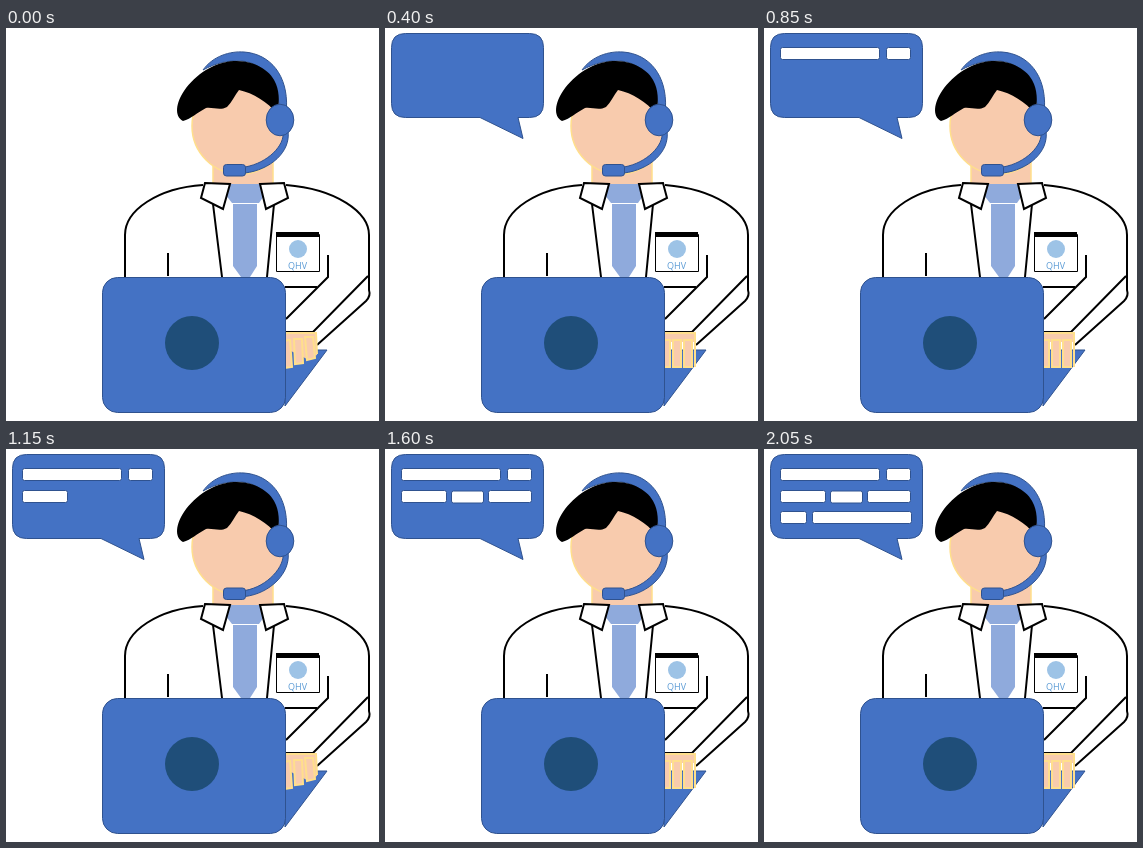
An HTML page with a canvas that plays this animation: 373 by 393 pixels, repeating every 4550 ms.

```html
<!DOCTYPE html>
<html lang="en">
<head>
<meta charset="utf-8">
<title>Help desk</title>
<style>
  html, body { margin: 0; width: 100%; height: 100%; overflow: hidden; background: #fff; }
  canvas { display: block; width: 373px; height: 393px; }
</style>
</head>
<body>
<canvas id="stage" width="373" height="393"></canvas>
<script>
const ctx = document.getElementById('stage').getContext('2d');
const LOOP = 4550;
const BLUE = '#4472c4', EDGE = '#2f528f', NAVY = '#1f4e79';
const TIE = '#8faadc', SKIN = '#f8cbad', GOLD = '#ffdf8c';

// Typed words: start time, x, y, width
const WORDS = [
  [700, 16, 19, 100], [850, 122, 19, 25],
  [1150, 16, 41, 46], [1300, 66, 41.5, 33], [1600, 103, 41, 44],
  [1750, 16, 62, 27], [2050, 48, 62, 100]
];
// The microphone flips between raised and lowered at these times
const NODS = [300, 400, 700, 850, 1150, 1300, 1600, 1750, 2050];

function paint(path, fill, stroke, width = 1) {
  if (fill) {
    ctx.fillStyle = fill;
    ctx.fill(path);
  }
  if (stroke) {
    ctx.strokeStyle = stroke;
    ctx.lineWidth = width;
    ctx.stroke(path);
  }
}

function shape(d, fill, stroke, width) {
  paint(new Path2D(d), fill, stroke, width);
}

function box(x, y, w, h, r, fill, stroke, width) {
  const p = new Path2D();
  p.roundRect(x, y, w, h, r);
  paint(p, fill, stroke, width);
}

function oval(x, y, rx, ry, fill, stroke, width) {
  const p = new Path2D();
  p.ellipse(x, y, rx, ry, 0, 0, Math.PI * 2);
  paint(p, fill, stroke, width);
}

function drawHead(low) {
  box(207, 125, 60, 33, 0, SKIN, GOLD, 1.5);
  oval(234, 98, 48, 48, SKIN, GOLD, 1.5);
  shape('M197 42C207 28 224 23 238 24C265 26 282 48 280.5 80L273 80C273 55 258 35 236 33C222 32 210 35 197 42Z', BLUE, EDGE);
  shape('M177 93C168 88 170 75 178 63C190 46 208 34 228 33C250 32 266 44 270 56C274 66 273 76 271 86C262 74 247 65 233 62C229 67 226 74 221 79C214 83 207 79 200 80C192 84 185 91 177 93Z', '#000');
  // Microphone arm
  const y = 139 + low;
  shape(`M277 104C279 117 262 ${y - 4} 239 ${y}L239 ${y + 6}C264 ${y + 3} 285 124 282 103Z`, BLUE, EDGE);
  oval(274, 92, 13.8, 15.8, BLUE, EDGE);
  box(217.5, 136.5 + low, 22, 11.5, 3, BLUE, EDGE);
}

function drawCoat() {
  shape('M119 249V207C119 182 152 160 197 157M280 157C330 161 363 184 363 207V262Q365 268 360 273L311 317', null, '#000', 2);
  shape('M162 225V248M207 176L216 249M268 176L261 249', null, '#000', 2);
  shape('M222 156H256L260 165L253 175H226L219 166Z', TIE);
  shape('M227 176H251V238L244 249H235L227 238Z', TIE);
  shape('M199 155L224 156L217 181L195 170Z', '#fff', '#000', 2);
  shape('M254 156L278 155L282 170L260 181Z', '#fff', '#000', 2);
  shape('M322 227V249L280 291M279 259H311M362 248L307 304H280', null, '#000', 2);
}

function drawBadge() {
  box(270.5, 206.5, 43, 37, 0, '#fff', '#000');
  box(270, 204, 43, 5, 0, '#000');
  oval(292, 221, 9, 9, '#9dc3e6');
  ctx.fillStyle = '#5b9bd5';
  ctx.font = '9px "Open Sans", sans-serif';
  ctx.textAlign = 'center';
  ctx.fillText('QHV', 291.5, 241);
}

function drawHand(tapping) {
  shape('M279 322H321L279 378Z', BLUE, EDGE);
  if (tapping) {
    shape('M279 305H310L311 327L301 331L279 320Z', SKIN);
    shape('M277 313L284 312L286 339L278 340Z', SKIN, GOLD, 2);
    shape('M288 311H296L297 335L289 336Z', SKIN, GOLD, 2);
    shape('M299 309H307L309 330L301 332Z', SKIN, GOLD, 2);
    shape('M279 305H310L311 326', null, GOLD, 2);
  } else {
    box(279, 305, 31, 9, 0, SKIN);
    for (const x of [277, 288, 299]) box(x, 312, 8, 27, 0, SKIN, GOLD, 2);
    shape('M279 305H310V339', null, GOLD, 2);
  }
}

function drawLaptop() {
  box(96.5, 249.5, 183, 135, 15, BLUE, EDGE);
  oval(186, 315, 27, 27, NAVY);
}

function drawBubble(t) {
  if (t < 300) return;
  ctx.save();
  if (t < 400) {
    ctx.translate(84.5, 74);
    ctx.rotate(-0.588);
    ctx.scale(0.64, 0.64);
    ctx.translate(-82.5, -47.5);
  }
  shape('M20.5 5.5H144.5Q158.5 5.5 158.5 19.5V75.5Q158.5 89 134 89.5L138 110.5L95 89.5H20.5Q6.5 89.5 6.5 75.5V19.5Q6.5 5.5 20.5 5.5Z'
    .replace('Q158.5 89 134 89.5', 'Q158.5 89.5 144.5 89.5H133'), BLUE, EDGE);
  ctx.restore();
  for (const [start, x, y, w] of WORDS) {
    if (t >= start) box(x + 0.5, y + 0.5, w - 1, 12, 2, '#fff', EDGE);
  }
}

function draw(t) {
  const nods = NODS.filter(n => t >= n).length;
  const tapping = t < 400 || (t >= 1150 && t < 1600);
  ctx.fillStyle = '#fff';
  ctx.fillRect(0, 0, 373, 393);
  drawHead(nods % 2 ? 2.5 : 0);
  drawCoat();
  drawBadge();
  drawHand(tapping);
  drawLaptop();
  drawBubble(t);
}

const begin = performance.now();
function tick() {
  draw((performance.now() - begin) % LOOP);
  requestAnimationFrame(tick);
}
tick();
</script>
</body>
</html>
```
